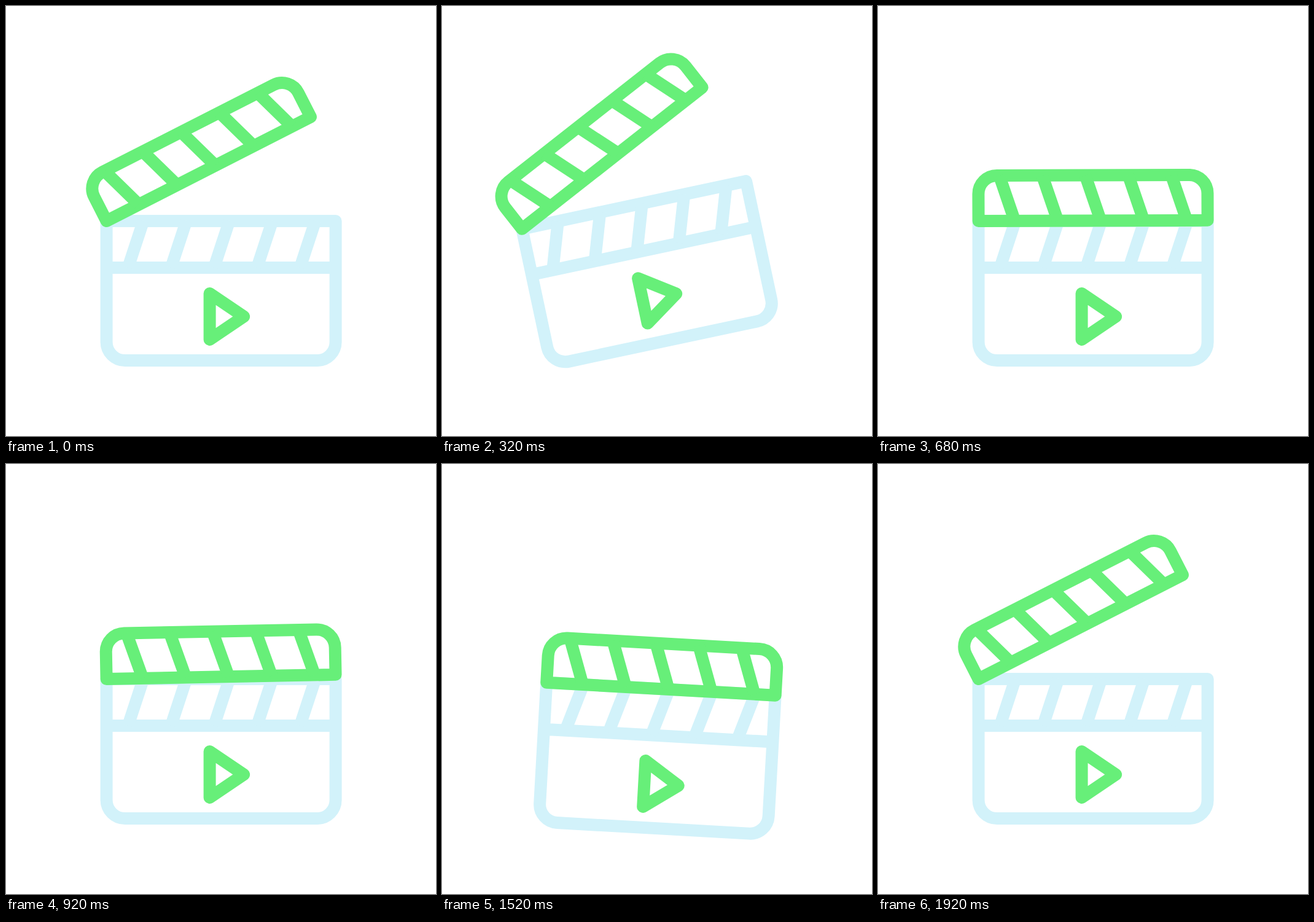
Write an HTML page that moves like this. It is 700 px wide and 700 px high and loops after 2 s.

```html
<!DOCTYPE html>
<html lang="en">
<head>
<meta charset="utf-8">
<title>Clapperboard</title>
<style>
  html, body { margin: 0; width: 100%; height: 100%; overflow: hidden; background: #fff; }
  svg { display: block; width: 100%; height: 100%; }
  path { fill: none; stroke-width: 20; stroke-linejoin: round; }
  .pale { stroke: #d2f2fa; }
  .green { stroke: #67ef79; }
</style>
</head>
<body>
<svg viewBox="0 0 700 700">
  <g id="board">
    <g class="pale">
      <path d="M164 350H537V547a30 30 0 0 1-30 30H194a30 30 0 0 1-30-30ZM164 426H537"/>
      <path id="lowerStripes"/>
    </g>
    <path class="green" d="M332 468L387.5 505.5L332 543Z"/>
    <g id="clap" class="green">
      <path d="M164 350V306a30 30 0 0 1 30-30H507a30 30 0 0 1 30 30V350Z"/>
      <path id="upperStripes"/>
    </g>
  </g>
</svg>
<script>
const LOOP = 2000, STEP = 40;
const board = document.getElementById('board');
const clap = document.getElementById('clap');

// Five slanted bars, 70 apart
function addStripes(id, x, y, dx, dy) {
  let d = '';
  for (let i = 0; i < 5; i++) d += `M${x + 70 * i} ${y}l${dx} ${dy}`;
  document.getElementById(id).setAttribute('d', d);
}
addStripes('lowerStripes', 224, 350, -25, 76);
addStripes('upperStripes', 198, 276, 25, 74);

// Smooth rise from 0 to 1 between two times
function ramp(t, from, to) {
  const u = Math.min(1, Math.max(0, (t - from) / (to - from)));
  return u * u * (3 - 2 * u);
}
// Rises to 1 at peak, stays until hold, is back at 0 at end
const pulse = (t, start, peak, hold, end) => ramp(t, start, peak) - ramp(t, hold, end);

// Two decaying rebounds after the clap shuts
function rebound(t) {
  const s = t - 680;
  return s > 0 && s < 320 ? 7.6 * Math.exp(-s / 124) * Math.abs(Math.sin(Math.PI * s / 160)) : 0;
}

function opening(t) {
  const windUp = 27 - 13.7 * ramp(t, 0, 120);
  const swing = 25.6 * ramp(t, 120, 520);
  const shut = (windUp + swing) * (1 - ramp(t, 560, 685));
  const reopen = 36 * ramp(t, 1520, 1680) - 9.6 * ramp(t, 1680, 1840) + 0.6 * ramp(t, 1840, 1920);
  return shut + rebound(t) + reopen;
}

function draw(t) {
  const dip = pulse(t, 0, 80, 80, 400) + pulse(t, 1280, 1480, 1480, 1620);
  const lift = pulse(t, 80, 400, 520, 640);
  const x = -0.4 - 16.4 * lift, y = 20 * dip - 37.5 * lift, tilt = 4 * dip - 15 * lift;
  board.setAttribute('transform', `translate(${x} ${y}) rotate(${tilt} 350.5 463.5)`);
  clap.setAttribute('transform', `rotate(${-opening(t)} 164 350)`);
}

let start;
function tick(now) {
  start ??= now;
  const t = (now - start + 2) % LOOP;
  draw(Math.floor(t / STEP) * STEP);
  requestAnimationFrame(tick);
}
draw(0);
requestAnimationFrame(tick);
</script>
</body>
</html>
```
